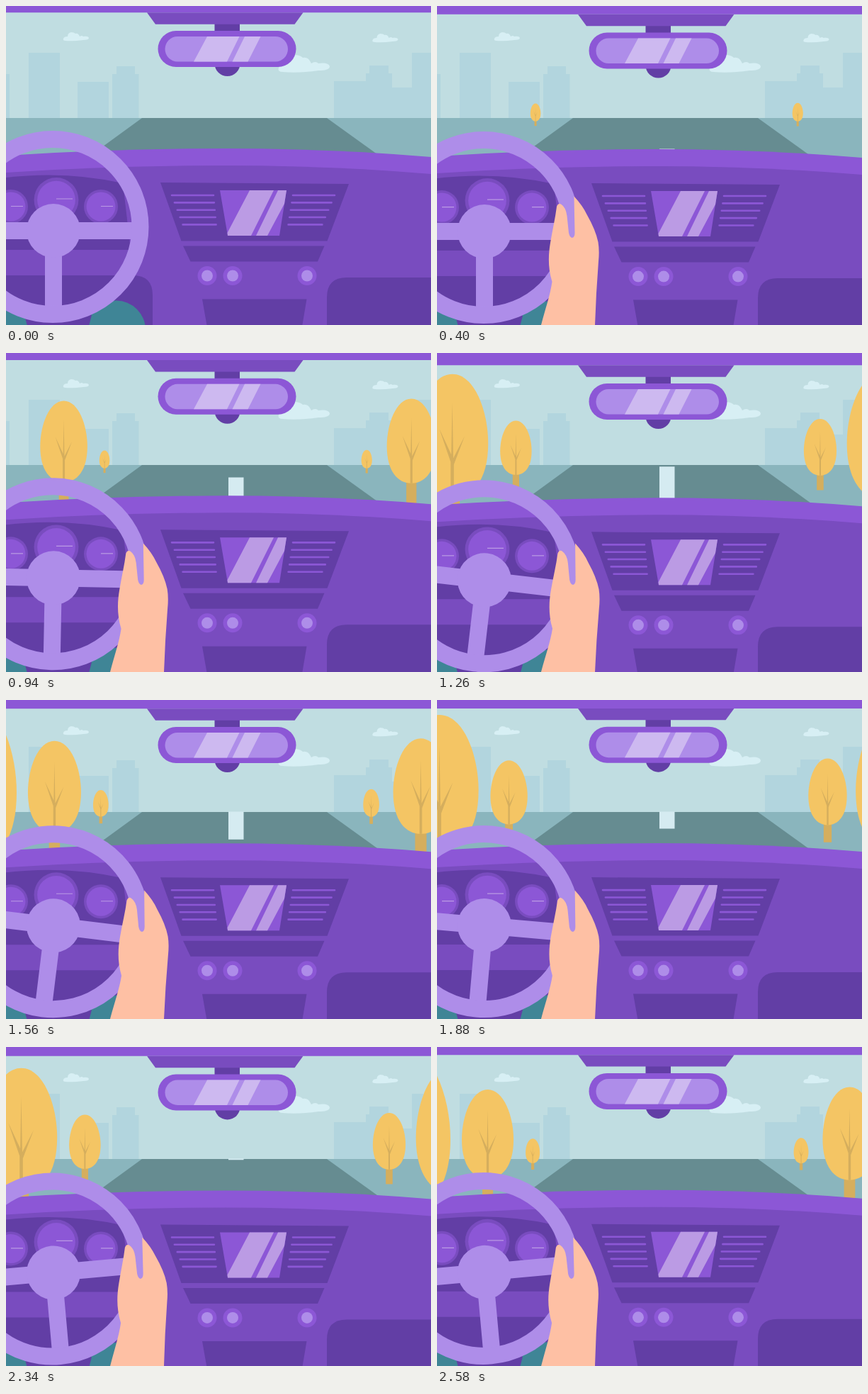
These frames come from a looping animation (600 by 450 pixels, 2.6 s). An HTML page:

```html
<!DOCTYPE html>
<html lang="en">
<head>
<meta charset="utf-8">
<title>Driving</title>
<style>
  html, body { margin: 0; width: 100%; height: 100%; overflow: hidden; background: #c0dde1; }
  svg { display: block; width: 600px; height: 450px; }
  .main { fill: #794cbf; }
  .lit { fill: #8c57d6; }
  .dark { fill: #623ea5; }
  .pale { fill: #ae8de9; }
  .gleam { fill: #cdb9f0; }
  .glare { fill: #bb9be4; }
  .city { fill: #b2d5de; }
  .cloud { fill: #d7eff4; }
  .leg { fill: #3f8596; }
  .bark { fill: #d5ae5d; }
  .leaf { fill: #f4c564; }
  .vents { stroke: #8c57d6; stroke-width: 2.6; stroke-linecap: round; }
  .needles { stroke: #bb9be4; stroke-width: 1.2; }
</style>
</head>
<body>
<svg viewBox="0 0 600 450">
  <defs>
    <path id="cloud" class="cloud" d="M0 9Q1 6 6 6Q6 1 11 0Q15 0 17 2Q21 1 23 6Q26 4 28 6Q35 5 36 8Q36 11 28 11Q14 13 3 12Q-1 12 0 9Z"/>
    <g id="tree">
      <path class="bark" d="M-6 96H6V126H-6Z"/>
      <path class="leaf" d="M0 0C18 0 29 30 29 56C29 86 16 100 0 100S-29 86 -29 56C-29 30 -18 0 0 0Z"/>
      <path class="bark" d="M0 23L.8 68L10 50L1.300 73V100H-1.300V71L-10.500 44L-.8 65Z"/>
    </g>
    <g id="knob">
      <circle class="lit" r="13.500"/>
      <circle class="pale" r="8"/>
    </g>
    <g id="gauge">
      <circle class="main" r="24"/>
      <circle class="lit" r="20.500"/>
    </g>
    <clipPath id="ground"><path d="M0 157.500H600V450H0Z"/></clipPath>
  </defs>

  <path fill="#c0dde1" d="M0 0H600V450H0Z"/>
  <path class="city" d="M0 96H5V158H0ZM32 66H76V158H32ZM101 107H145V158H101ZM150 96H156V85H182V96H187.500V158H150Z"/>
  <path class="city" d="M463 106H508V95H513V84H540V95H545V115H573V66H600V158H463Z"/>
  <use href="#cloud" x="81" y="37"/>
  <use href="#cloud" x="517.500" y="39"/>
  <use href="#cloud" transform="translate(385 69) scale(2)"/>
  <path fill="#8ab5bd" d="M0 158H600V260H0Z"/>
  <path fill="#668c91" d="M192 158H453L553 230H93Z"/>
  <g clip-path="url(#ground)"><path id="dash" fill="#d5ebf1" d="M314 0H335.500V51H314Z"/></g>
  <g id="trees"></g>

  <g id="cabin">
    <path class="lit" d="M0 211Q150 201 310 201Q460 201 600 213V300H0Z"/>
    <path class="main" d="M0 235Q150 225 310 225Q460 225 600 237V480H0Z"/>
    <path class="dark" d="M0 242Q85 232 165 250L176 344H0Z"/>
    <path class="dark" d="M0 380H179Q207 380 207 408V480H0Z"/>
    <path class="dark" d="M600 383H481Q453 383 453 411V480H600Z"/>
    <circle class="leg" cx="-10" cy="460" r="43"/>
    <circle class="leg" cx="155.500" cy="457" r="41.500"/>
    <path class="dark" d="M26 436H121L112 470H35Z"/>
    <use href="#gauge" x="7" y="283"/>
    <use href="#gauge" x="134" y="283"/>
    <use href="#gauge" transform="translate(71 273.500) scale(1.310)"/>
    <path class="needles" d="M71 272H94M7 282.500H24M134 282.500H151"/>

    <path class="dark" d="M218 249L484 251L453.500 331.500H247.500Z"/>
    <path class="dark" d="M250 338.500H449.500L440 360.500H260.500Z"/>
    <path class="dark" d="M277 413.500H424.500L415 470H287Z"/>
    <path id="vents" class="vents"/>
    <path class="lit" d="M302 260H396L386 324H313Z"/>
    <path class="glare" d="M344 260H378L346 324H313L312.500 320ZM384 260H396L393 279L369 324H353Z"/>
    <use href="#knob" x="284" y="380.500"/>
    <use href="#knob" x="320" y="380.500"/>
    <use href="#knob" x="425" y="380.500"/>

    <g id="wheel">
      <path class="pale" d="M-50 305H180V329H-50ZM55 317H79V432H55Z"/>
      <circle class="pale" cx="67" cy="317" r="38"/>
      <circle cx="66" cy="311.500" r="123.500" fill="none" stroke="#ae8de9" stroke-width="24"/>
    </g>
  </g>

  <path id="hand" fill="#fec0a4" d="M147 450C153 427 160 407 162.500 389C156 368 157.500 349 160 334C163 316 167 299 169 283Q171 277.500 175 279.500Q182 284 183.500 296L186 320Q187.500 327 191 327Q194.500 326 194.500 320L193.500 268.500Q206 282 212 295Q224 316 227.500 333Q229.500 345 228 360L225 405L223 450V720H147Z"/>

  <g id="roof">
    <path class="dark" d="M294.500 20H330V40H294.500Z"/>
    <path class="lit" d="M0 -30H600V9.300H0Z"/>
    <path class="main" d="M199 9.300H419.500L407.500 25.700H211Z"/>
    <circle class="dark" cx="312.500" cy="81" r="18"/>
    <rect class="lit" x="214.500" y="35" width="195" height="51" rx="25.500"/>
    <rect class="pale" x="224.500" y="43" width="173.500" height="35.500" rx="17.700"/>
    <path class="gleam" d="M284 43H329.500L312 78.500H265ZM337 43H359.500L341.500 78.500H319.500Z"/>
  </g>
</svg>

<script>
  const LOOP = 2600, GAP = 540;
  const $ = id => document.getElementById(id);
  const move = (el, value) => el.setAttribute('transform', value);

  // Keys are [time, value] pairs; the value holds before the first and after the last.
  const linear = p => p;
  const smooth = p => (1 - Math.cos(Math.PI * p)) / 2;
  const easeOut = p => 1 - (1 - p) ** 3;
  function at(keys, t, ease) {
    const i = keys.findIndex(([time]) => time > t);
    if (i < 0) return keys[keys.length - 1][1];
    if (i === 0) return keys[0][1];
    const [t0, a] = keys[i - 1], [t1, b] = keys[i];
    return a + (b - a) * ease((t - t0) / (t1 - t0));
  }

  const bounce = [[0, 0], [280, 2.8], [860, 0], [1260, 8], [1780, 0], [1920, 3.2], [2180, 0], [2380, 3.8], [2780, 0]];
  const steer = [[800, 0], [1340, 7], [1700, 7], [2380, -5.2]];
  const reach = [[40, 1], [360, 0]];
  const pace = [[0, 0], [2340, 2340], [2600, 2645]];

  // Each side of the road: where trees appear, how far they drift, how sharply, and their size.
  const sides = [
    { x: 150, drift: -78, power: 2.15, size: 1 },
    { x: 494, drift: 88, power: 1.92, size: 1.04 }
  ];

  const trees = [];
  for (let born = 4 * GAP; born >= 0; born -= GAP) {
    for (const side of sides) {
      const el = document.createElementNS('http://www.w3.org/2000/svg', 'use');
      el.setAttribute('href', '#tree');
      $('trees').append(el);
      trees.push({ el, side, born });
    }
  }

  let vents = '';
  for (let i = 0; i < 5; i++) {
    const y = 267 + 10.35 * i;
    vents += `M${234 + 3.9 * i} ${y}H${293 + 0.9 * i}M${405 - 1.6 * i} ${y}H${464 - 4.4 * i}`;
  }
  $('vents').setAttribute('d', vents);

  function placeTree({ el, side, born }, clock) {
    const s = (clock - born) / 1000;
    const shown = s > 0.3 && s < 1.75;
    el.style.display = shown ? '' : 'none';
    if (!shown) return;
    const h = side.size * (24 * s * s + 134 * s - 32.5);
    const x = side.x + side.drift * s ** side.power;
    const base = 160 + 0.08 * h + 0.001 * h * h;
    move(el, `translate(${x} ${base - h}) scale(${h / 100})`);
  }

  function draw(t) {
    const lift = at(bounce, t, smooth);
    const turn = at(steer, t, smooth);
    const away = at(reach, t, easeOut);
    const clock = at(pace, t, linear);

    move($('roof'), `translate(0 ${lift})`);
    move($('cabin'), `translate(0 ${lift * 0.42})`);
    move($('wheel'), `rotate(${turn} 67 316)`);
    move($('hand'), `translate(${away * 30} ${away * 190}) rotate(${turn * 0.075} 185 450)`);
    move($('dash'), `translate(0 ${201.5 - 0.048 * (t - 400)})`);
    for (const tree of trees) placeTree(tree, clock);
  }

  const start = performance.now();
  function tick() {
    draw((performance.now() - start) % LOOP);
    requestAnimationFrame(tick);
  }
  tick();
</script>
</body>
</html>
```
